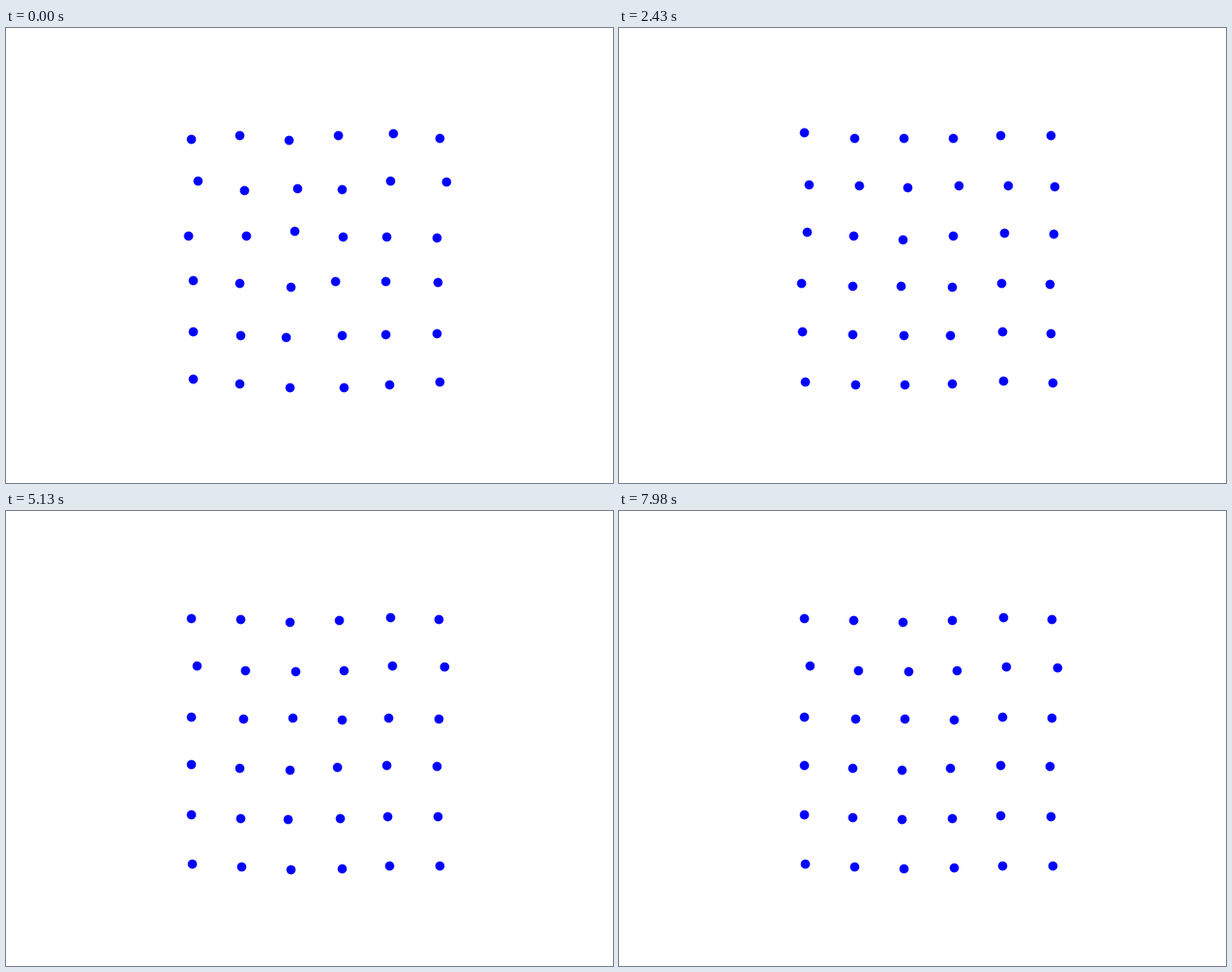
Write a matplotlib script that moves like this. It is 640 px wide and 480 px high and loops after 8 s.

```python
import numpy as np
import matplotlib.pyplot as plt
from matplotlib.animation import FuncAnimation

FRAMES, LOOP = 267, 8000
N = 6                    # atoms per side
SPACING = 52.1           # pixels between neighbours at rest
CENTER = (326, 243)
FREQ = 0.1793            # vibration cycles per step
PHASE = 1.15             # where in the cycle the loop begins
DECAY = 127              # steps until the swing falls to 1/e
SWING = 11               # largest starting displacement in pixels

# Rows have slid sideways and columns up or down as rigid chains
row_slide = np.array([-1, 4, 0, -2.5, -2, 0])
col_slide = np.array([-1.5, 1.7, 3, 2, -0.7, 0.2])

offset = (np.arange(N) - (N - 1) / 2) * SPACING
rest_x = CENTER[0] + offset[None, :] + row_slide[:, None]
rest_y = CENTER[1] + offset[:, None] + col_slide[None, :]

# Random stretch along each chain, with its centre of mass kept still
rng = np.random.default_rng(6)
swing_x = rng.uniform(-SWING, SWING, (N, N))
swing_y = rng.uniform(-SWING, SWING, (N, N))
swing_x -= swing_x.mean(axis=1, keepdims=True)
swing_y -= swing_y.mean(axis=0, keepdims=True)

fig = plt.figure(figsize=(6.4, 4.8), dpi=100, facecolor="white")
ax = fig.add_axes([0, 0, 1, 1])
ax.set_xlim(-0.5, 639.5)
ax.set_ylim(479.5, -0.5)
ax.axis("off")
dots, = ax.plot([], [], "bo", markersize=6)


def draw(step):
    wave = np.exp(-step / DECAY) * np.cos(2 * np.pi * FREQ * step + PHASE)
    dots.set_data((rest_x + swing_x * wave).ravel(),
                  (rest_y + swing_y * wave).ravel())
    return dots,


anim = FuncAnimation(fig, draw, frames=FRAMES, interval=LOOP / FRAMES,
                     init_func=lambda: draw(0), repeat=True, repeat_delay=0)
plt.show()
```
